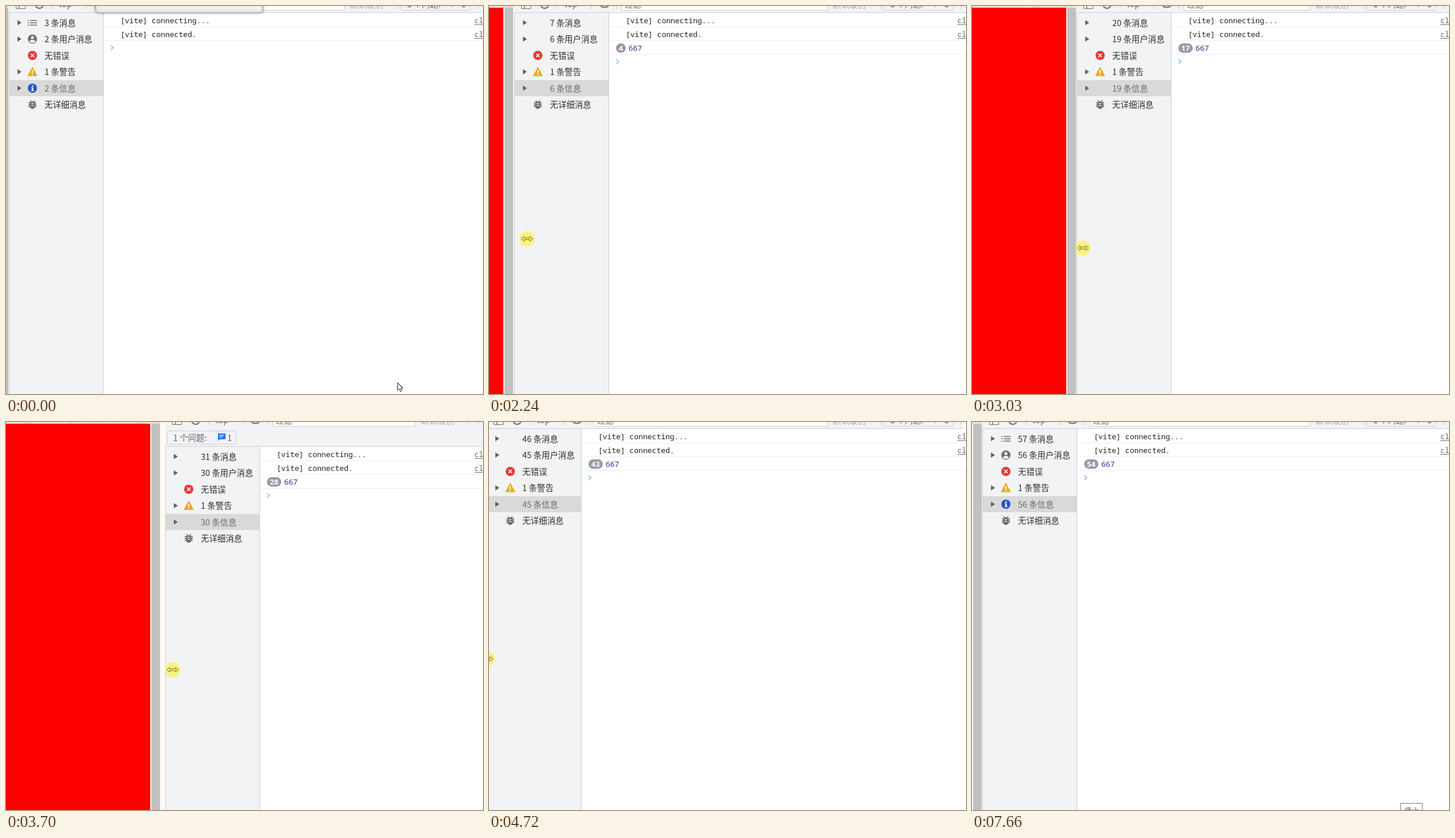
Recreate the animation shown at these times as an HTML page with a canvas. Size 830 by 675 pixels, loop 7.92 s.

```html
<!DOCTYPE html>
<html lang="zh">
<head>
<meta charset="utf-8">
<title>Console</title>
<style>
html, body { margin: 0; overflow: hidden; background: #fff; }
canvas { display: block; }
</style>
</head>
<body>
<canvas id="stage" width="830" height="675"></canvas>
<script>
const W = 830, H = 675, LOOP = 7920;
const g = document.getElementById('stage').getContext('2d');
const UI = '14.4px "Noto Sans CJK SC", "Noto Sans CJK", sans-serif';
const MONO = '13px "Noto Sans Mono", monospace';
const GRAY = '#6e6e6e', LINE = '#cacdd1', INK = '#2b2d30', PANEL = '#f1f3f4';

// Pointer path: time, x, y. Everything that is dragged follows from it.
const path = [
  [20, 681, 655], [800, 6, 398], [1730, 6, 401], [2090, 13.5, 401], [2240, 66, 405], [3030, 192.5, 421],
  [3370, 225, 425], [3700, 290, 431], [3800, 305, 432], [4150, 44, 415], [4450, -3, 412], [4720, -3, 412],
  [5450, 19, 429], [6040, 19, 429], [6160, 15, 418], [6820, 696, 624], [6960, 728, 663], [7320, 728, 663],
  [7420, 724, 682]
];

const clamp = (v, lo, hi) => Math.max(lo, Math.min(hi, v));

function pointer(t) {
  const i = clamp(path.findIndex(k => k[0] > t), 1, path.length - 1);
  const j = t >= path[path.length - 1][0] ? path.length - 1 : i;
  const a = path[j - 1], b = path[j], f = clamp((t - a[0]) / (b[0] - a[0]), 0, 1);
  return [1, 2].map(k => a[k] + (b[k] - a[k]) * f);
}

// The panel trails the pointer; the page beside it is laid out only at intervals.
const panelEdge = t => Math.round(pointer(clamp(t - 60, 1730, 5450))[0] - 1);
const pageEdge = t => panelEdge(Math.floor((t - 26) / 79) * 79 + 26) - 1;
const logCount = t => Math.min(54, Math.floor(17.45 * (Math.max(0, t - 2000) / 1030) ** .95));

function rect(x, y, w, h, color) {
  g.fillStyle = color;
  g.fillRect(x, y, w, h);
}

function text(s, x, y, color, font = UI) {
  g.font = font;
  g.fillStyle = color;
  g.fillText(s, x, y);
}

function oval(x, y, rx, ry, fill, stroke) {
  g.beginPath();
  g.ellipse(x, y, rx, ry, 0, 0, 7);
  if (fill) { g.fillStyle = fill; g.fill(); }
  if (stroke) { g.strokeStyle = stroke; g.lineWidth = 2; g.stroke(); }
}

function poly(points, fill, stroke, width = 1) {
  g.beginPath();
  points.forEach(([x, y]) => g.lineTo(x, y));
  if (fill) { g.closePath(); g.fillStyle = fill; g.fill(); }
  if (stroke) { g.strokeStyle = stroke; g.lineWidth = width; g.stroke(); }
}

function box(x, y, w, h, r, fill, stroke) {
  g.beginPath();
  g.roundRect(x, y, w, h, r);
  g.fillStyle = fill;
  g.fill();
  if (stroke) { g.strokeStyle = stroke; g.lineWidth = 1; g.stroke(); }
}

const icons = {
  list() {
    for (let y = -4.5; y < 4; y += 4) {
      rect(-8, y, 2, 1.6, GRAY);
      rect(-4, y, 12, 1.6, GRAY);
    }
  },
  user() {
    oval(0, 0, 8, 8, GRAY);
    oval(0, -2.6, 2.6, 2.6, PANEL);
    oval(0, 4, 5, 2.6, PANEL);
  },
  error() {
    oval(0, 0, 8, 8, '#e53935');
    for (const s of [-3, 3]) poly([[-s, -3], [s, 3]], 0, '#fff', 1.7);
  },
  warning() {
    poly([[0, -8], [8, 7], [-8, 7]], '#eeab1c', '#eeab1c');
    rect(-1, -3, 2, 5, '#fff');
    rect(-1, 3.5, 2, 2, '#fff');
  },
  info() {
    oval(0, 0, 8, 8, '#2a56c6');
    rect(-1, -5, 2.4, 2.2, '#fff');
    rect(-1, -1.5, 2.4, 6, '#fff');
    rect(-2, -1.5, 2, 1.3, '#fff');
    rect(-2.2, 3.4, 4.8, 1.3, '#fff');
  },
  bug() {
    for (let y = -4; y < 4; y += 3.2) rect(-7, y, 14, 1.8, GRAY);
    box(-4.5, -5.5, 9, 13, 4.5, GRAY);
    for (const s of [-1, 1]) {
      poly([[s * 4, -7.5], [s, -4]], 0, GRAY, 1.6);
      rect(-1.8, s * 1.75 - .7, 3.6, 1.5, PANEL);
    }
  }
};

function drawPage(end, hover) {
  rect(0, 0, end + 20, H, '#fdf9f5');
  for (let x = 0; x < end; x += 15)
    rect(x, 0, Math.min(15, end - x), 3, `hsl(${25 + 15 * Math.sin(x)}, 60%, 88%)`);
  if (end > 17) rect(0, 3, end - 17, H, '#f00');
  rect(end - 15, 3, 15, H, hover ? '#a8a8a8' : '#c1c1c1');
}

function issues(x, y) {
  box(x + .5, y + .5, 120, 23, 2, PANEL, LINE);
  text('1 个问题:', x + 11, y + 18, '#5f6368');
  box(x + 89, y + 5, 13, 10, 1, '#1a73e8');
  poly([[x + 89, y + 14], [x + 93, y + 14], [x + 89, y + 18]], '#1a73e8');
  rect(x + 91, y + 7.5, 9, 1.2, '#fff');
  rect(x + 91, y + 10.5, 6, 1.2, '#fff');
  text('1', x + 105, y + 18, '#5f6368');
}

function drawToolbar(p, wrap, popup) {
  const bottom = wrap ? 42 : 11, shift = wrap ? 124 : 0, x = p + 186;
  rect(p, 0, W, bottom, PANEL);
  rect(p, bottom, W, 1, LINE);
  box(p + 12.5, -9, 16, 13.5, 0, PANEL, GRAY);
  rect(p + 17, -9, 1.4, 13, GRAY);
  oval(p + 53, -3, 7, 7, 0, GRAY);
  oval(p + 157, -3, 8, 5.5, 0, GRAY);
  for (const sep of [p + 75, p + 134, p + 178, 682 + shift, 821]) rect(sep, 0, 1, 5, '#bfc3c7');
  text('top', p + 87, 2, '#5f6368');
  box(x + .5, -10, 588 + shift - x, 17.5, 0, '#fff', LINE);
  text('过滤', x + 6, 3, '#6b6f73');
  text('默认级别', 598 + shift, 3, '#a9acaf');
  if (wrap) issues(p + 3, 15); else issues(687, -16);
  if (popup) {
    g.save();
    g.shadowColor = '#0006';
    g.shadowBlur = 5;
    box(156, -20, 291, 31.5, 5, '#f0f1f2', '#a5a5a5');
    g.restore();
  }
}

function drawSidebar(p, top, n, busy) {
  const rows = [
    ['list', n + 3 + ' 条消息', true],
    ['user', n + 2 + ' 条用户消息', true],
    ['error', '无错误'],
    ['warning', '1 条警告', true],
    ['info', n + 2 + ' 条信息', true],
    ['bug', '无详细消息']
  ];
  rect(p, top, 164, H, PANEL);
  rect(p, 0, 1, H, LINE);
  rect(p + 164, top, 1, H, LINE);
  rect(p + 1, top + 117, 163, 28, '#d9d9d9');
  rows.forEach(([icon, label, opens], i) => {
    g.save();
    g.translate(p + 41, top + 17 + i * 28.5);
    if (opens) poly([[-26, -4.5], [-19, 0], [-26, 4.5]], '#5f6368');
    if (!busy || !['list', 'user', 'info'].includes(icon)) icons[icon]();
    text(label, 21, 5.5, icon === 'info' ? '#6b6b6b' : INK);
    g.restore();
  });
}

function drawLog(p, top, n) {
  rect(p + 165, top, W, H, '#fff');
  ['[vite] connecting...', '[vite] connected.'].forEach((s, i) => {
    const y = top + 18 + i * 24;
    text(s, p + 194, y, '#202124', MONO);
    text('client', 815, y, '#5f6368', MONO);
    rect(815, y + 2, 15, 1, GRAY);
    rect(p + 165, y + 6, W, 1, '#ededed');
  });
  if (n) {
    const w = n > 9 ? 25 : 17;
    if (n > 1) {
      box(p + 177, top + 53, w, 16.5, 8.2, '#a196a5');
      g.textAlign = 'center';
      text(n, p + 177 + w / 2, top + 66, '#fff', 'bold 13px "Open Sans", sans-serif');
      g.textAlign = 'left';
    }
    text('667', p + (n > 1 ? 182 + w : 194), top + 66, '#23328a', MONO);
    rect(p + 165, top + 72, W, 1, '#e6eef5');
  }
  const x = p + 177.5, y = top + (n ? 85 : 60.5);
  poly([[x, y - 4], [x + 4, y], [x, y + 4]], 0, '#7fc0ea', 1.6);
}

function drawPointer(t) {
  const [x, y] = pointer(t).map(Math.round);
  g.save();
  g.translate(x, y);
  if (t > 1240 && t < 6100) {
    const pressed = t >= 1730 && t < 5770;
    const half = [[-10, 0], [-5, -4], [-5, -1.5], [5, -1.5], [5, -4]];
    if (pressed) oval(0, 0, 13, 13, '#f8f27c');
    poly([...half, ...half.map(([a, b]) => [-a, -b])], pressed ? '#f8f27c' : '#fff', '#5c5228', .9);
  } else {
    poly([[.5, .5], [.5, 13.5], [3.4, 10.8], [5.4, 15.8], [7.6, 14.8], [5.6, 10], [9.5, 10]], '#fff', '#222');
    poly([[9.5, 10], [.5, .5]], 0, '#222');
  }
  g.restore();
}

function drawTooltip(alpha) {
  g.globalAlpha = clamp(alpha, 0, 1);
  box(745.5, 663.5, 38, 24, 0, '#fff', '#767676');
  text('停止', 752.5, 681, '#575757', '12.5px "Noto Sans CJK SC", sans-serif');
  g.globalAlpha = 1;
}

function draw(t) {
  const p = panelEdge(t), n = logCount(t);
  const wrap = p > 215, top = wrap ? 43 : 12;
  rect(0, 0, W, H, '#fff');
  drawPage(pageEdge(t), t > 840 && t < 1240);
  drawSidebar(p, top, n, n > 0 && t < 5830);
  drawLog(p, top, n);
  drawToolbar(p, wrap, t < 1980);
  drawPointer(t);
  drawTooltip((t - 7480) / 180);
}

const start = performance.now();
function tick() {
  draw((performance.now() - start) % LOOP);
  requestAnimationFrame(tick);
}
tick();
</script>
</body>
</html>
```
